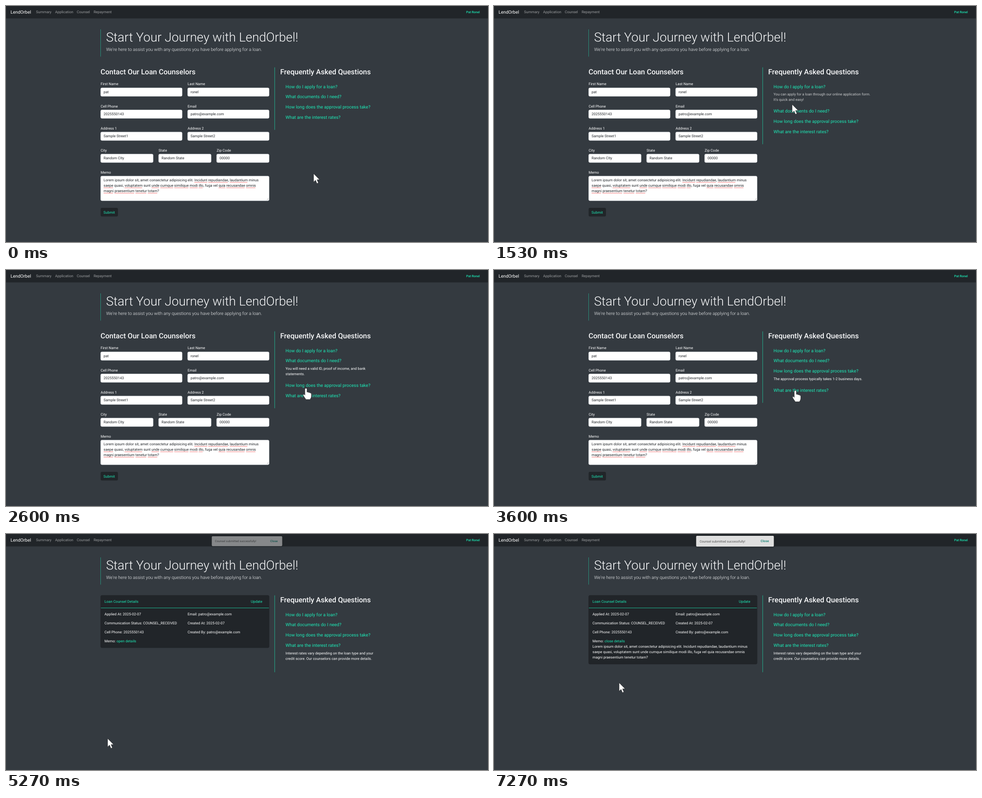
Write an HTML page that moves like this. It is 1067 by 525 pixels and loops after 8.34 s.

```html
<!DOCTYPE html>
<html lang="en">
<head>
<meta charset="utf-8">
<title>Loan counsel</title>
<style>
  html, body { margin: 0; width: 100%; height: 100%; overflow: hidden; background: #343a40; }
  svg { display: block; width: 1067px; height: 525px; }
  text { font: 400 8px Roboto, sans-serif; fill: #fff; white-space: pre; text-rendering: geometricPrecision; }
  .teal { fill: #1de9b6; }
  .nav { fill: #9b9d9f; }
  .ink { fill: #212529; }
  .brand, .question { font-size: 10px; }
  .title { font-size: 28px; font-weight: 300; fill: #f8f9fa; }
  .lead { font-size: 10px; font-weight: 300; fill: #f8f9fa; }
  .h2 { font-size: 16px; font-weight: 500; fill: #f8f9fa; }
  .user { font-size: 7px; font-weight: 500; }
  .note { font-size: 7px; fill: #505050; }
  .close { font-size: 7px; font-weight: 500; letter-spacing: .1px; fill: #00796b; }
  .field { fill: #fff; stroke: #ced4da; stroke-width: .5; }
  .wave { fill: none; stroke: #e33; stroke-width: .7; }
  #toast rect { fill: #dfdfdf; filter: drop-shadow(0 1.5px 2px rgba(0, 0, 0, .4)); }
  #cursor path { fill: #fff; stroke: #222; stroke-width: .6; stroke-linejoin: round; }
</style>
</head>
<body>
<svg id="stage" viewBox="0 0 1067 525">
  <rect width="1067" height="525" fill="#343a40"/>
  <rect width="1067" height="27.6" fill="#212529"/>
  <rect x="209" y="52" width="1" height="60.5" fill="#1de9b6" opacity=".5"/>
  <g id="base"></g>
  <g id="form"></g>
  <g id="card">
    <rect id="panel" x="209.5" y="136.5" width="373" rx="3" fill="#212529" stroke="#1c1f22" stroke-width=".5"/>
    <rect x="210" y="164" width="372" height="1" fill="#1de9b6" opacity=".75"/>
    <clipPath id="fold"><rect id="foldBox" x="210" y="244.5" width="372"/></clipPath>
    <g id="details" clip-path="url(#fold)"></g>
  </g>
  <rect id="rule" x="594.3" y="136.5" width="1" fill="#1de9b6" opacity=".7"/>
  <g id="faq"></g>
  <g id="toast"><rect x="447.5" y="4" width="172" height="24" rx="2"/></g>
  <g id="cursor">
    <path d="M0 0V18.5L4.3 14.6 7.3 21.8 10.5 20.5 7.5 13.5 13 13.2Z"/>
    <path d="M-2.2 15.5V2.2a2.2 2.2 0 0 1 4.4 0V8.6q3-.6 3.6 1 2.8-.5 3.4 1 2.8-.2 2.8 2.2v5q0 3.4-2.4 6.2v1H-.6v-1Q-2.8 21-5.6 16.6q-1.2-2.6.8-3 1.4 0 2.6 1.9z"/>
  </g>
</svg>
<script>
const $ = id => document.getElementById(id);
const clamp = v => Math.max(0, Math.min(1, v));

function add(parent, tag, attrs, content = '') {
  const el = document.createElementNS('http://www.w3.org/2000/svg', tag);
  for (const key in attrs) el.setAttribute(key, attrs[key]);
  el.textContent = content;
  return parent.appendChild(el);
}

// y is the middle of the capitals
function label(parent, x, y, content, cls = '', size = 8) {
  return add(parent, 'text', { x, y: y + size * .355, class: cls }, content);
}

const base = $('base'), form = $('form'), card = $('card');
const brand = 'LendOrbel', phone = '2025550143', email = 'patro@example.com';

label(base, 10, 13.6, brand, 'brand', 10);
label(base, 66.5, 13.6, 'Summary', 'nav');
label(base, 108.7, 13.6, 'Application', 'nav');
label(base, 156.8, 13.6, 'Counsel', 'nav');
label(base, 193.9, 13.6, 'Repayment', 'nav');
label(base, 1018.7, 13.8, 'Pat Ronel', 'user teal', 7);
label(base, 221.5, 69, `Start Your Journey with ${brand}!`, 'title', 28);
label(base, 221.8, 96.8, "We're here to assist you with any questions you have before applying for a loan.", 'lead', 10);
label(base, 607, 146.2, 'Frequently Asked Questions', 'h2', 16);

// Contact form
label(form, 209.2, 146.2, 'Contact Our Loan Counselors', 'h2', 16);
const rows = [
  [['First Name', 'pat'], ['Last Name', 'ronel']],
  [['Cell Phone', phone], ['Email', email]],
  [['Address 1', 'Sample Street1'], ['Address 2', 'Sample Street2']],
  [['City', 'Random CIty'], ['State', 'Random State'], ['Zip Code', '00000']]
];
rows.forEach((row, r) => row.forEach(([name, value], c) => {
  const pitch = 385 / row.length, x = 209.5 + c * pitch, y = 182 + r * 49.1;
  label(form, x, y - 8.4, name);
  add(form, 'rect', { x, y, width: pitch - 12, height: 19, rx: 3, class: 'field' });
  label(form, x + 6.5, y + 9.2, value, 'ink');
}));

const memo = [
  'Lorem ipsum dolor sit, amet consectetur adipisicing elit. Incidunt repudiandae, laudantium minus',
  'saepe quasi, voluptatem sunt unde cumque similique modi illo, fuga vel quia recusandae omnis',
  'magni praesentium tenetur totam?'
];
const misspelt = /Incidunt|repudiandae|laudantium|saepe|voluptatem|unde|cumque|similique|modi|illo|quia|recusandae|omnis|magni|praesentium|tenetur|totam/g;

function underline(text, y) {
  for (const hit of text.textContent.matchAll(misspelt)) {
    const from = text.getStartPositionOfChar(hit.index).x;
    const to = text.getEndPositionOfChar(hit.index + hit[0].length - 1).x;
    let d = '';
    for (let x = from, i = 0; x <= to; x += 1.5, i++) d += `${i ? 'L' : 'M'}${x} ${y + (i % 2 ? -.6 : .6)}`;
    add(form, 'path', { d, class: 'wave' });
  }
}

label(form, 209.5, 369.8, 'Memo');
add(form, 'rect', { x: 209.5, y: 378.3, width: 373, height: 54.9, rx: 3, class: 'field' });
memo.forEach((line, i) => underline(label(form, 216, 387.4 + i * 12, line, 'ink'), 392.4 + i * 12));
add(form, 'path', { d: 'M577 431.7l4-4M579.5 431.7l1.5-1.5', stroke: '#888', 'stroke-width': .6 });
const button = add(form, 'rect', { x: 209.5, y: 449, width: 38.3, height: 19.2, rx: 3 });
label(form, 215.8, 458.7, 'Submit', 'teal');

// Counsel card
label(card, 218, 150.2, 'Loan Counsel Details', 'teal');
label(card, 542, 150.2, 'Update', 'teal');
[
  ['Applied At: 2025-02-07', `Email: ${email}`],
  ['Communication Status: COUNSEL_RECEIVED', 'Created At: 2025-02-07'],
  [`Cell Phone: ${phone}`, `Created By: ${email}`],
  ['Memo:']
].forEach((row, r) => row.forEach((s, c) => label(card, c ? 402 : 218, 178.6 + r * 20, s)));
const toggle = label(card, 244.8, 238.6, '', 'teal');
memo.forEach((line, i) => label($('details'), 218, 250.6 + i * 12, line));

// Questions; each answer fades in at its click and out at the next one
const faq = [
  ['How do I apply for a loan?', 'You can apply for a loan through our online application form.', "It's quick and easy!"],
  ['What documents do I need?', 'You will need a valid ID, proof of income, and bank', 'statements.'],
  ['How long does the approval process take?', 'The approval process typically takes 1-2 business days.'],
  ['What are the interest rates?', 'Interest rates vary depending on the loan type and your', 'credit score. Our counselors can provide more details.']
].map(([question, ...lines]) => {
  const item = add($('faq'), 'g', {});
  label(item, 618.8, 179, question, 'question teal', 10);
  const answer = add(item, 'g', {});
  lines.forEach((line, i) => label(answer, 618.8, 196.6 + i * 12, line));
  return { item, answer, height: 8 + 12 * lines.length };
});
const clicks = [20, 28, 44, 57, Infinity];

label($('toast'), 455.3, 16.1, 'Counsel submitted successfully!', 'note', 7);
label($('toast'), 590.3, 15.8, 'Close', 'close', 7);

// Pointer stops: tick, x, y, hand shape
const stops = [
  [6, 681, 373, 0], [9, 687, 330, 0], [16, 658, 180, 1], [20, 658, 180, 1], [21, 658, 187, 0],
  [23, 660, 219, 0], [26, 660, 231, 1], [32, 660, 231, 1], [33, 660, 234, 0], [37, 663, 253, 1],
  [39, 664, 263, 1], [41, 664, 264, 1], [48, 664, 264, 1], [54, 667, 268, 1], [59, 667, 268, 1],
  [60, 640, 275, 0], [66, 149, 430, 0], [69, 222, 455, 1], [71, 225, 455, 1], [79, 225, 455, 0],
  [83, 225, 455, 0], [91, 312, 240, 0], [95, 285, 238, 1], [97, 277, 237, 1], [102, 277, 237, 1],
  [103, 277, 250, 0], [109, 277, 331, 0]
];

function drawPointer(n) {
  const last = Math.max(0, stops.findLastIndex(s => s[0] <= n));
  const a = stops[last], b = stops[last + 1] || a;
  const u = clamp((n - a[0]) / (b[0] - a[0] || 1));
  const x = a[1] + (b[1] - a[1]) * u, y = a[2] + (b[2] - a[2]) * u;
  const [arrow, hand] = $('cursor').children;
  $('cursor').setAttribute('transform', `translate(${x} ${y})`);
  arrow.style.display = a[3] ? 'none' : '';
  hand.style.display = a[3] ? '' : 'none';
}

function drawFaq(n) {
  let shift = 0;
  faq.forEach(({ item, answer, height }, i) => {
    const fade = start => clamp((n - start + .3) / 4.5);
    const open = n >= clicks[i] && n < clicks[i + 1] + 5;
    item.setAttribute('transform', `translate(0 ${i * 22.9 + shift})`);
    answer.style.opacity = open ? fade(clicks[i]) * (1 - fade(clicks[i + 1])) : 0;
    if (open) shift += height;
  });
  $('rule').setAttribute('height', 139 + shift);
}

function drawCard(n) {
  const u = n < 101 ? 0 : clamp((n - 100.4) / 5);
  const grow = 36.3 * u * u * (3 - 2 * u);
  toggle.textContent = n < 101 ? 'open details' : 'close details';
  $('panel').setAttribute('height', 116.6 + grow);
  $('foldBox').setAttribute('height', grow);
}

function drawToast(n) {
  const u = n < 79 ? 0 : clamp((n - 78.4) / 2.25);
  const p = 1 - (1 - u) ** 2.46;
  $('toast').style.opacity = p;
  $('toast').setAttribute('transform', `translate(533.5 16) scale(${.8 + .2 * p}) translate(-533.5 -16)`);
}

function draw(now) {
  const n = Math.min(124, Math.floor((now % 8340 + 4) * 15 / 1000));
  const sent = n >= 79;
  form.style.display = sent ? 'none' : '';
  card.style.display = sent ? '' : 'none';
  button.setAttribute('fill', n < 69 ? '#212529' : n >= 73 && n < 77 ? '#4d5154' : '#424649');
  drawFaq(n);
  drawCard(n);
  drawToast(n);
  drawPointer(n);
}

const start = performance.now();
function loop() {
  draw(performance.now() - start);
  requestAnimationFrame(loop);
}
loop();
</script>
</body>
</html>
```
